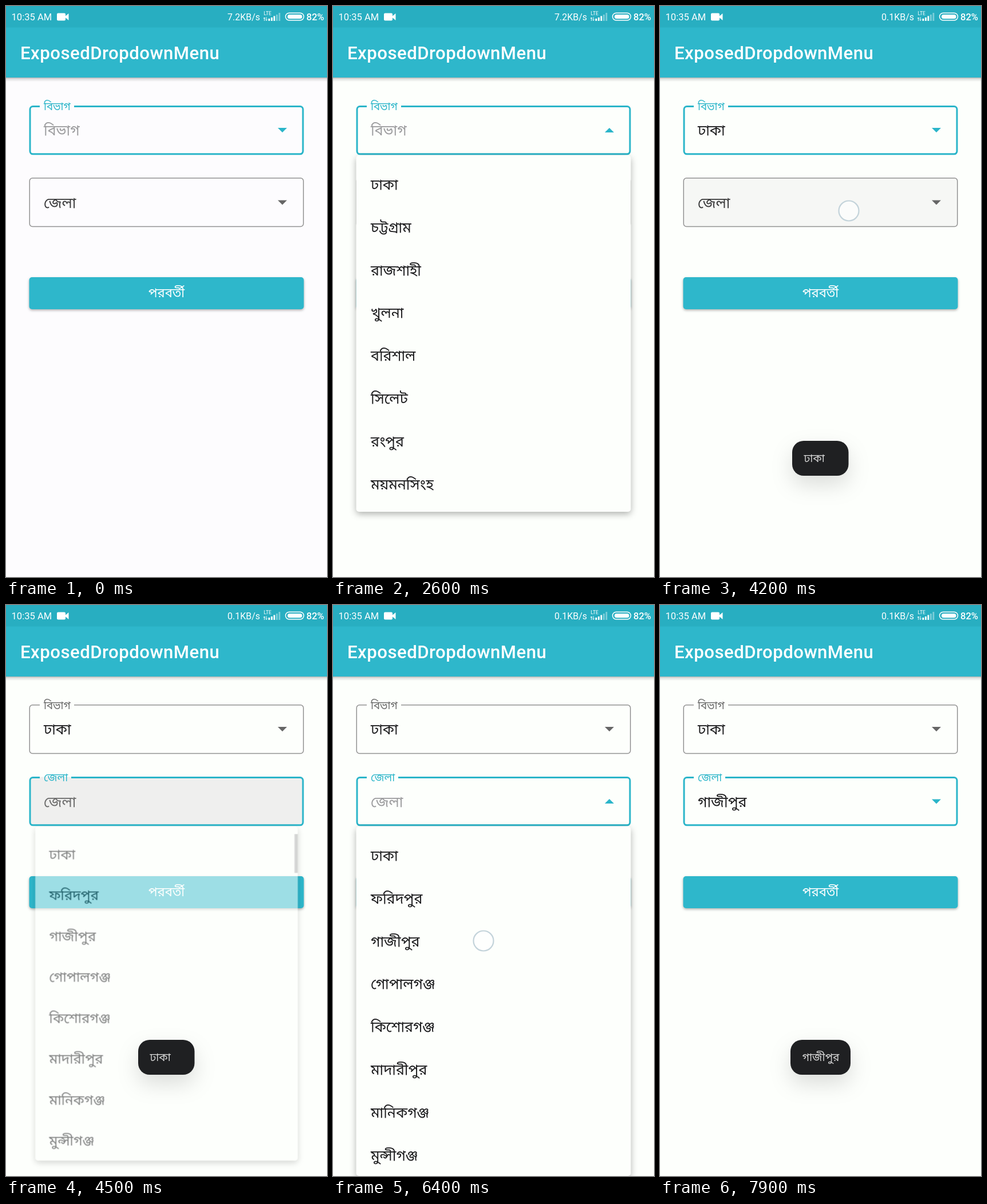
These frames come from a looping animation (561x998 px, 8 s). An HTML page:

```html
<!DOCTYPE html>
<html lang="bn">
<head>
<meta charset="utf-8">
<title>ExposedDropdownMenu</title>
<style>
  html, body { margin: 0; width: 100%; height: 100%; overflow: hidden; background: #fdfffc; }
  svg { display: block; width: 100vw; height: 100vh; }
  text { font-family: Roboto, "Noto Sans Bengali", "Noto Sans", sans-serif; font-size: 25px; white-space: pre; }
  .status text { font-size: 16.6px; fill: #fff; }
  .small { font-size: 18.7px; }
  .outline { fill: none; }
  .focus { stroke: #2bb5c9; stroke-width: 3; }
  .idle { stroke: #929292; stroke-width: 1.5; }
  .teal { fill: #2bb5c9; }
  .gray { fill: #666; }
  .value { fill: #1c1c1e; }
  .hint { fill: #9c9c9e; }
  .paper { fill: #fdfffc; }
  .menu .paper { filter: drop-shadow(0 4px 6px rgba(0,0,0,.3)); }
  .toast rect { fill: #1f2022; filter: drop-shadow(0 16px 18px rgba(0,0,0,.13)); }
  .toast text { font-size: 19px; fill: #d6d6d6; }
  .touch { fill: rgba(255,255,255,.6); stroke: #c3d3da; stroke-width: 2.2; }
</style>
</head>
<body>
<svg id="stage" viewBox="0 0 561 998" preserveAspectRatio="none"></svg>
<script>
const LOOP = 8000;
const DIVISIONS = ['ঢাকা', 'চট্টগ্রাম', 'রাজশাহী', 'খুলনা', 'বরিশাল', 'সিলেট', 'রংপুর', 'ময়মনসিংহ'];
const DISTRICTS = ['ঢাকা', 'ফরিদপুর', 'গাজীপুর', 'গোপালগঞ্জ', 'কিশোরগঞ্জ', 'মাদারীপুর', 'মানিকগঞ্জ', 'মুন্সীগঞ্জ'];

const text = (x, y, value, attrs = '') => `<text x="${x}" y="${y}" ${attrs}>${value}</text>`;

// Rounded frame whose top edge is open between x = 59 and gapEnd.
function outline(id, top, kind, gapEnd) {
  const inset = kind === 'focus' ? 1.5 : .75;
  const l = 40.5 + inset, r = 520.5 - inset, t = top + inset, b = top + 86.3 - inset, c = 5;
  return `<path id="${id}" class="outline ${kind}" d="M${gapEnd} ${t}H${r - c}a${c} ${c} 0 0 1 ${c} ${c}V${b - c}` +
    `a${c} ${c} 0 0 1 -${c} ${c}H${l + c}a${c} ${c} 0 0 1 -${c} -${c}V${t + c}a${c} ${c} 0 0 1 ${c} -${c}H59"/>`;
}

const fill = (id, top) => `<rect id="${id}" x="41" y="${top + .5}" width="479" height="85" rx="6" fill="#efefee"/>`;

function arrow(id, y, kind, up) {
  const s = up ? -1 : 1;
  return `<path id="${id}" class="${kind}" d="M475 ${y - 4 * s}h16l-8 ${8 * s}z"/>`;
}

const menu = (id, top, height, items, extra = '') =>
  `<g id="${id}" class="menu" style="transform-origin:280.5px ${top}px">
    <rect class="paper" x="40.5" y="${top}" width="480" height="${height}" rx="5"/>
    ${items.map((name, i) => text(66, top + 60 + i * 74.8, name, 'class="value"')).join('')}${extra}</g>`;

const toast = (id, x, width, name) =>
  `<g id="${id}" class="toast"><rect x="${x}" y="760" width="${width}" height="61" rx="20"/>
    ${text(x + 20.5, 797, name)}</g>`;

const touch = (id, x, y) => `<circle id="${id}" class="touch" cx="${x}" cy="${y}" r="17.5"/>`;

const signal = [4, 6, 8.5, 11, 14].map((h, i) =>
  `<rect x="${458.5 + i * 4.5}" y="${26 - h}" width="2.8" height="${h}" fill="#fff" opacity="${i < 3 ? 1 : .4}"/>`).join('');

document.getElementById('stage').innerHTML = `
  <defs><linearGradient id="shade" x2="0" y2="1">
    <stop stop-color="#000" stop-opacity=".34"/><stop offset=".35" stop-color="#000" stop-opacity=".12"/>
    <stop offset="1" stop-color="#000" stop-opacity="0"/>
  </linearGradient></defs>
  <rect id="page" width="561" height="998" fill="#fdfffc"/>
  <rect y="124.5" width="561" height="8" fill="url(#shade)"/>
  <rect width="561" height="125" fill="#2eb7cb"/>
  <rect width="561" height="37.5" fill="#28aec1"/>
  <g class="status">
    ${text(9.5, 25, '10:35 AM')}
    <path d="M91 12.5h11q2 0 2 2v3l5.5-4.5v12l-5.5-4.5v3q0 2-2 2h-11q-2 0-2-2v-9q0-2 2-2z" fill="#fff"/>
    ${text(387, 25, '7.2KB/s', 'id="speedA" style="font-size:16px"')}
    ${text(387, 25, '0.1KB/s', 'id="speedB" style="font-size:16px"')}
    ${text(450.5, 16, 'LTE', 'style="font-size:8.5px"')}
    <path d="M451.5 26v-6m-1.5 2l1.5-2 1.5 2M455 19.500v6m-1.500-2l1.500 2 1.500-2" fill="none" stroke="#fff" stroke-width=".9"/>
    ${signal}
    <rect x="488.500" y="12.200" width="32" height="12.800" rx="6.400" fill="none" stroke="#fff" stroke-width="1.500"/>
    <rect x="492" y="15" width="25.500" height="7.200" rx="3.500" fill="#fff"/>
    ${text(525, 25, '82%', 'font-weight="500"')}
  </g>
  ${text(25, 93, 'ExposedDropdownMenu', 'fill="#fff" font-weight="500" style="font-size:31.2px;letter-spacing:.45px"')}

  ${fill('press1', 174)}
  ${outline('focus1', 174, 'focus', 119)}${outline('idle1', 174, 'idle', 119)}
  ${text(66, 181.5, 'বিভাগ', 'id="label1" class="small"')}
  ${text(66, 226, 'বিভাগ', 'id="hint1" class="hint"')}
  ${text(66, 226, 'ঢাকা', 'id="value1" class="value"')}
  ${arrow('down1', 217, 'teal')}${arrow('up1', 217, 'teal', true)}${arrow('rest1', 217, 'gray')}

  ${fill('press2', 300)}
  ${outline('focus2', 300, 'focus', 114)}${outline('idle2', 300, 'idle', 59)}
  <g id="label2">${text(0, 0, 'জেলা')}</g>
  ${text(66, 352.5, 'জেলা', 'id="hint2" class="hint"')}
  ${text(66, 352.5, 'গাজীপুর', 'id="value2" class="value"')}
  ${arrow('rest2', 343.500, 'gray')}${arrow('down2', 343.500, 'teal')}${arrow('up2', 343, 'teal', true)}

  <rect x="40.500" y="474" width="480" height="56" rx="5" fill="#2eb7cb" style="filter:drop-shadow(0 2px 2px rgba(0,0,0,.3))"/>
  ${text(280.5, 509, 'পরবর্তী', 'fill="#fff" text-anchor="middle" style="font-size:22px"')}

  ${menu('menu1', 261, 623, DIVISIONS)}
  ${menu('menu2', 387, 611, DISTRICTS,
    '<rect id="scrollbar" x="514.500" y="401" width="6" height="71" fill="#b1b2b1"/>')}
  ${toast('toast1', 231, 98.5, 'ঢাকা')}${toast('toast2', 228, 105, 'গাজীপুর')}
  ${touch('tap1', 330, 233)}${touch('pick1', 262, 324)}${touch('tap2', 330, 358)}${touch('pick2', 263, 587)}
`;

// Each step [time, value] holds until the next one.
function track(id, prop, ...steps) {
  const frames = steps.map(([time, value]) => ({ offset: time / LOOP, [prop]: value, easing: 'steps(1)' }));
  frames.push({ offset: 1, [prop]: steps.at(-1)[1] });
  document.getElementById(id).animate(frames, { duration: LOOP, iterations: Infinity });
}
const fade = (id, ...steps) => track(id, 'opacity', ...steps);
const show = (id, from, to = LOOP) => fade(id, ...(from ? [[0, 0]] : []), [from, 1], ...(to < LOOP ? [[to, 0]] : []));
const pulse = (id, start) => fade(id, [0, 0], [start, 1], [start + 200, .12], [start + 300, 0]);
const press = (id, start) => fade(id, [0, 0], [start, .5], [start + 100, 1], [start + 400, .4], [start + 500, 0]);

function popup(id, open, close) {
  fade(id, [0, 0], [open, .54], [open + 100, 1], [close, .45], [close + 100, 0]);
  track(id, 'transform', [0, 'scale(.956)'], [open + 100, 'scale(1)']);
}

track('page', 'fill', [0, '#fdfcfe'], [400, '#fdfffc']);
show('speedA', 0, 4000);
show('speedB', 4000);

pulse('tap1', 1500);
press('press1', 1500);
track('hint1', 'fill', [0, '#9c9c9e'], [1500, '#6c6c6c'], [1900, '#9c9c9e']);
popup('menu1', 1800, 3100);
fade('down1', [0, 1], [1800, 0], [3200, 1], [4400, 0]);
show('up1', 1900, 3100);
fade('pick1', [0, 0], [3000, 1], [3100, .4], [3200, 0]);
show('hint1', 0, 3100);
show('value1', 3100);
fade('toast1', [0, 0], [3200, .5], [3300, 1], [5200, .7], [5300, .3], [5400, 0]);

pulse('tap2', 4200);
press('press2', 4200);
show('focus1', 0, 4400);
show('idle1', 4400);
show('rest1', 4400);
track('label1', 'fill', [0, '#2bb5c9'], [4400, '#686868']);
show('idle2', 0, 4400);
show('focus2', 4400);
track('label2', 'transform', [0, 'translate(66px,352.5px)'],
  [4400, 'translate(66px,328px) scale(.86)'], [4500, 'translate(66px,308px) scale(.748)']);
track('label2', 'fill', [0, '#3b3b3c'], [4400, '#2bb5c9']);
show('rest2', 0, 4400);
track('hint2', 'fill', [0, '#6c6c6c'], [4600, '#9c9c9e']);
show('hint2', 4500, 6500);
popup('menu2', 4500, 6500);
fade('scrollbar', [0, 1], [5800, .5], [5900, 0]);
show('up2', 4600, 6600);
fade('pick2', [0, 0], [6300, .6], [6400, 1], [6500, .4], [6600, 0]);
show('value2', 6500);
fade('down2', [0, 0], [4400, 1], [4500, 0], [6600, 1]);
fade('toast2', [0, 0], [6700, .6], [6800, 1]);
</script>
</body>
</html>
```
